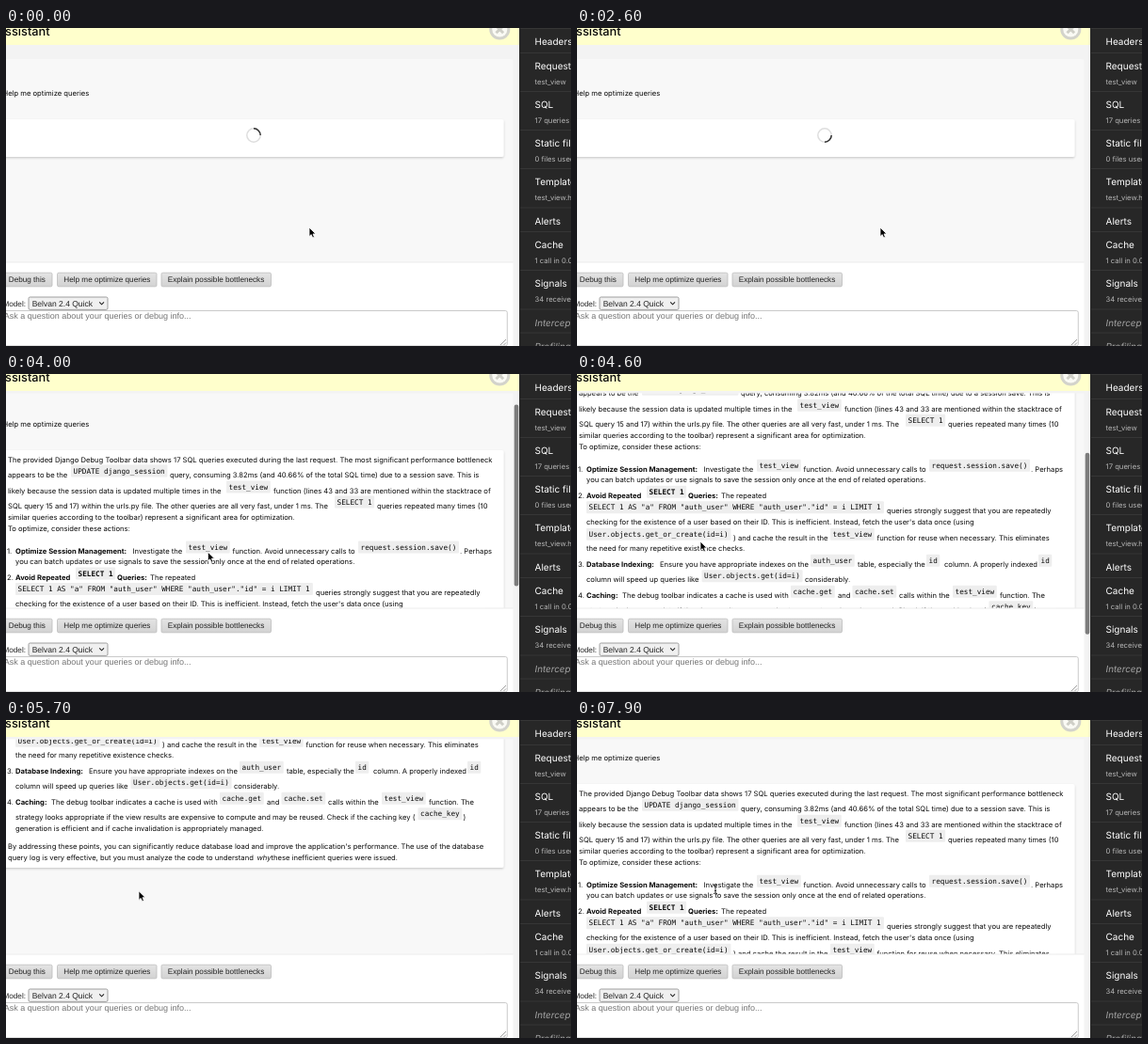
Recreate the animation shown at these times as an HTML page. Size 600 by 338 pixels, loop 8000 ms.

```html
<!DOCTYPE html>
<html lang="en">
<head>
<meta charset="utf-8">
<title>Query assistant</title>
<style>
  html, body { margin: 0; width: 100%; height: 100%; overflow: hidden; background: #fff; }
  svg { display: block; width: 600px; height: 338px; }
  text { font: 7.64px Inter, sans-serif; fill: #0a0a0a; white-space: pre; text-rendering: geometricPrecision; }
  .bold { font-weight: 700; }
  .italic { font-style: italic; }
  .code { font: 7.7px "DejaVu Sans Mono", monospace; }
  .code.bold { font-weight: 700; }
  .title { font-size: 12.8px; font-weight: 500; }
  .control { font: 8.17px "Liberation Sans", Arial, sans-serif; fill: #222; }
  .option { font-size: 8.5px; }
  .hint { font-size: 9px; fill: #757575; }
  .panel { font-size: 10px; fill: #fff; }
  .off { font-size: 9.8px; fill: #a5a5a5; font-style: italic; }
  .sub { font-size: 7.7px; fill: #b5b5b5; }
</style>
</head>
<body>
<svg viewBox="0 0 600 338">
  <defs>
    <clipPath id="view"><rect y="20.5" width="546" height="228.5"/></clipPath>
    <linearGradient id="face" x2="0" y2="1">
      <stop stop-color="#e4e4e4"/><stop offset="1" stop-color="#d2d2d2"/>
    </linearGradient>
    <filter id="shade" x="-5%" y="-20%" width="110%" height="150%">
      <feDropShadow dx="0" dy="1.2" stdDeviation="1.3" flood-opacity=".2"/>
    </filter>
  </defs>

  <rect width="546" height="338" fill="#f3f3f3"/>
  <g clip-path="url(#view)">
    <g id="scroll">
      <rect x="-10" y="33" width="548.5" height="600" rx="3" fill="#f8f8f8"/>
      <text x="-3.5" y="72.4">Help me optimize queries</text>
      <rect id="card" x="-10" y="97" width="538.5" height="40" rx="2" fill="#fff" filter="url(#shade)"/>
      <g id="spinner" fill="none" stroke-width="1.5">
        <circle cx="263" cy="114" r="7.2" stroke="#dedede"/>
        <path d="M263 106.8A7.2 7.2 0 0 1 270.2 114" stroke="#333"/>
      </g>
      <g id="reply"></g>
    </g>
  </g>

  <rect width="546" height="18" fill="#ffc"/>
  <text class="title" x="-1" y="8.4">ssistant</text>
  <circle cx="524.3" cy="1.5" r="11" fill="#d3d3cb"/>
  <circle cx="524.3" cy="1.5" r="8" fill="#fafaf4"/>
  <path d="M520.5 -2.3l7.6 7.6m0 -7.6l-7.6 7.6" stroke="#cfcfc7" stroke-width="3"/>

  <rect y="249" width="538.5" height="89" fill="#fff"/>
  <rect y="248.5" width="538.5" height="1" fill="#ececec"/>
  <g id="form"></g>
  <text class="control" x="-3.5" y="295.5">Model:</text>
  <rect x="24" y="286" width="84" height="13.4" rx="1.5" fill="#f0f0f0" stroke="#8a8a8a" stroke-width=".8"/>
  <text class="control option" x="27.7" y="295.7">Belvan 2.4 Quick</text>
  <path d="M99.2 291.4l2.4 2.4 2.4-2.4" fill="none" stroke="#222" stroke-width="1.1"/>
  <rect x="-10" y="300.5" width="542.3" height="37.4" rx="2" fill="#fff" stroke="#bdbdbd" stroke-width=".8"/>
  <text class="control hint" x="-2.2" y="309.4">Ask a question about your queries or debug info...</text>
  <path d="M525 337l6-6m-2.5 6l2.5-2.5" stroke="#777" stroke-width=".7"/>

  <rect id="thumb" x="539.7" width="4.6" height="193" rx="2.3" fill="#7d7d7d"/>
  <rect x="545" width="55" height="338" fill="#272727"/>
  <g id="side"></g>

  <path id="arrow" d="M0 0V9.6L2.2 7.6 3.7 11 5.4 10.2 4 6.9H7Z" fill="#000" stroke="#fff" stroke-width=".8"/>
  <path id="beam" d="M-2 -4.5Q0 -4.5 0 -3.5Q0 -4.5 2 -4.5M0 -3.5V3.5M-2 4.5Q0 4.5 0 3.5Q0 4.5 2 4.5M-1 1.5H1" fill="none" stroke="#222" stroke-width=".9"/>
</svg>

<script>
const $ = id => document.getElementById(id);
const LOOP = 8000, STEP = 100, REPLY_AT = 2700, SPIN = 800;
const CODE_CHAR = 4.64;

function add(parent, tag, attrs, content = "") {
  const node = document.createElementNS("http://www.w3.org/2000/svg", tag);
  for (const key in attrs) node.setAttribute(key, attrs[key]);
  node.textContent = content;
  parent.append(node);
}

// Each row: centre line, then x and text. Marks: * bold, / italic, ` code, # bold code.
const rows = [
  [107, 2, "The provided Django Debug Toolbar data shows 17 SQL queries executed during the last request. The most significant performance bottleneck"],
  [123, 2, "appears to be the", 69, "`UPDATE django_session", 174, "query, consuming 3.82ms (and 40.66% of the total SQL time) due to a session save. This is"],
  [140, 2, "likely because the session data is updated multiple times in the", 234, "`test_view", 284, "function (lines 43 and 33 are mentioned within the stacktrace of"],
  [156, 2, "SQL query 15 and 17) within the urls.py file. The other queries are all very fast, under 1 ms. The", 349, "`SELECT 1", 394, "queries repeated many times (10"],
  [168, 2, "similar queries according to the toolbar) represent a significant area for optimization."],
  [180, 2, "To optimize, consider these actions:"],
  [204, 1, "1.", 10, "*Optimize Session Management:", 134.5, "Investigate the", 191, "`test_view", 240.5, "function. Avoid unnecessary calls to", 374, "`request.session.save()", 482, ". Perhaps"],
  [215.5, 10, "you can batch updates or use signals to save the session only once at the end of related operations."],
  [232, 1, "2.", 10, "*Avoid Repeated", 74, "#SELECT 1", 118, "*Queries:", 153, "The repeated"],
  [248.5, 10, "`SELECT 1 AS \"a\" FROM \"auth_user\" WHERE \"auth_user\".\"id\" = i LIMIT 1", 329, "queries strongly suggest that you are repeatedly"],
  [260, 10, "checking for the existence of a user based on their ID. This is inefficient. Instead, fetch the user's data once (using"],
  [277, 10, "`User.objects.get_or_create(id=i)", 166, ") and cache the result in the", 269, "`test_view", 318.5, "function for reuse when necessary. This eliminates"],
  [288.5, 10, "the need for many repetitive existence checks."],
  [305, 1, "3.", 10, "*Database Indexing:", 88, "Ensure you have appropriate indexes on the", 248, "`auth_user", 298, "table, especially the", 371, "`id", 390, "column. A properly indexed", 490, "`id"],
  [321.5, 10, "column will speed up queries like", 132.5, "`User.objects.get(id=i)", 242, "considerably."],
  [338, 1, "4.", 10, "*Caching:", 48, "The debug toolbar indicates a cache is used with", 227, "`cache.get", 277, "and", 292.5, "`cache.set", 342, "calls within the", 399, "`test_view", 449, "function. The"],
  [354.5, 10, "strategy looks appropriate if the view results are expensive to compute and may be reused. Check if the caching key (", 437.5, "`cache_key", 485.5, ")"],
  [366, 10, "generation is efficient and if cache invalidation is appropriately managed."],
  [385, 2, "By addressing these points, you can significantly reduce database load and improve the application's performance. The use of the database"],
  [397, 2, "query log is very effective, but you must analyze the code to understand", 266.5, "/why", 281.5, "these inefficient queries were issued."]
];
const marks = { "*": "bold", "/": "italic", "`": "code", "#": "code bold" };

for (const [y, ...parts] of rows) {
  for (let i = 0; i < parts.length; i += 2) {
    const x = parts[i], raw = parts[i + 1], kind = marks[raw[0]] || "";
    const words = kind ? raw.slice(1) : raw;
    if (kind.startsWith("code")) {
      add($("reply"), "rect", { x, y: y - 10.3, width: words.length * CODE_CHAR + 5, height: 13, rx: 1, fill: "#eee" });
      add($("reply"), "text", { x: x + 2.5, y: y - 1.4, class: kind }, words);
    } else {
      add($("reply"), "text", { x, y: y + 2.7, class: kind }, words);
    }
  }
}

for (const [x, width, label] of [[-4, 53, "Debug this"], [54.5, 105.5, "Help me optimize queries"], [165, 116.5, "Explain possible bottlenecks"]]) {
  add($("form"), "rect", { x, y: 260.2, width, height: 14.6, rx: 1.5, fill: "url(#face)", stroke: "#bcbcbc", "stroke-width": .8 });
  add($("form"), "text", { x: x + 6.8, y: 270.3, class: "control" }, label);
}

const panels = [
  [14.5, "Headers"], [40.5, "Request", "test_view"], [81.5, "SQL", "17 queries in 9.40ms"],
  [122.5, "Static files", "0 files used"], [163.5, "Templates", "test_view.html"], [205, "Alerts"],
  [230.5, "Cache", "1 call in 0.02ms"], [271.5, "Signals", "34 receivers"],
  [313, "Intercept redirects"], [338, "Profiling"]
];
for (const [y, name, note] of panels) {
  add($("side"), "rect", { x: 546, y: y - 14.5, width: 54, height: 1, fill: "#363636" });
  add($("side"), "text", { x: 561.5, y: y + 3.8, class: y > 300 ? "off" : "panel" }, name);
  if (note) add($("side"), "text", { x: 561.5, y: y + 19.2, class: "sub" }, note);
}

// Tracks hold [time, value...] and ease between entries.
const scrollTrack = [[3800, 0], [4600, 103], [5200, 251], [5700, 251], [6200, 29]];
const thumbTrack = [[3800, 0], [3900, 1], [5400, 1], [5600, 0], [5700, 0], [5800, 1], [6600, 1], [6900, 0]];
const pointerTrack = [[2800, 322, 212], [3600, 235, 192], [3800, 235, 192], [4500, 131, 178], [4700, 131, 178], [5400, 141, 182], [6400, 141, 181], [7200, 147, 180]];

function sample(track, t) {
  const next = track.findIndex(key => key[0] > t);
  if (next === 0) return track[0].slice(1);
  if (next < 0) return track[track.length - 1].slice(1);
  const a = track[next - 1], b = track[next];
  const p = (t - a[0]) / (b[0] - a[0]);
  const ease = p * p * (3 - 2 * p);
  return a.slice(1).map((v, i) => v + (b[i + 1] - v) * ease);
}

function draw(time) {
  const t = Math.floor((time % LOOP) / STEP) * STEP;
  const ready = t >= REPLY_AT;
  const [offset] = sample(scrollTrack, t);
  const [x, y] = sample(pointerTrack, t);
  const overText = t >= 6200;

  $("reply").style.display = ready ? "" : "none";
  $("spinner").style.display = ready ? "none" : "";
  $("spinner").setAttribute("transform", `rotate(${t / SPIN * 360 % 360} 263 114)`);
  $("card").setAttribute("height", ready ? 311 : 40);
  $("scroll").setAttribute("transform", `translate(0 ${-offset})`);
  $("thumb").setAttribute("y", Math.min(23 + offset * .59, 144));
  $("thumb").setAttribute("opacity", sample(thumbTrack, t)[0]);
  for (const id of ["arrow", "beam"]) {
    $(id).setAttribute("transform", `translate(${x} ${y})`);
    $(id).style.display = (id === "beam") === overText ? "" : "none";
  }
}

const start = performance.now();
function tick() {
  draw(performance.now() - start);
  requestAnimationFrame(tick);
}
tick();
</script>
</body>
</html>
```
